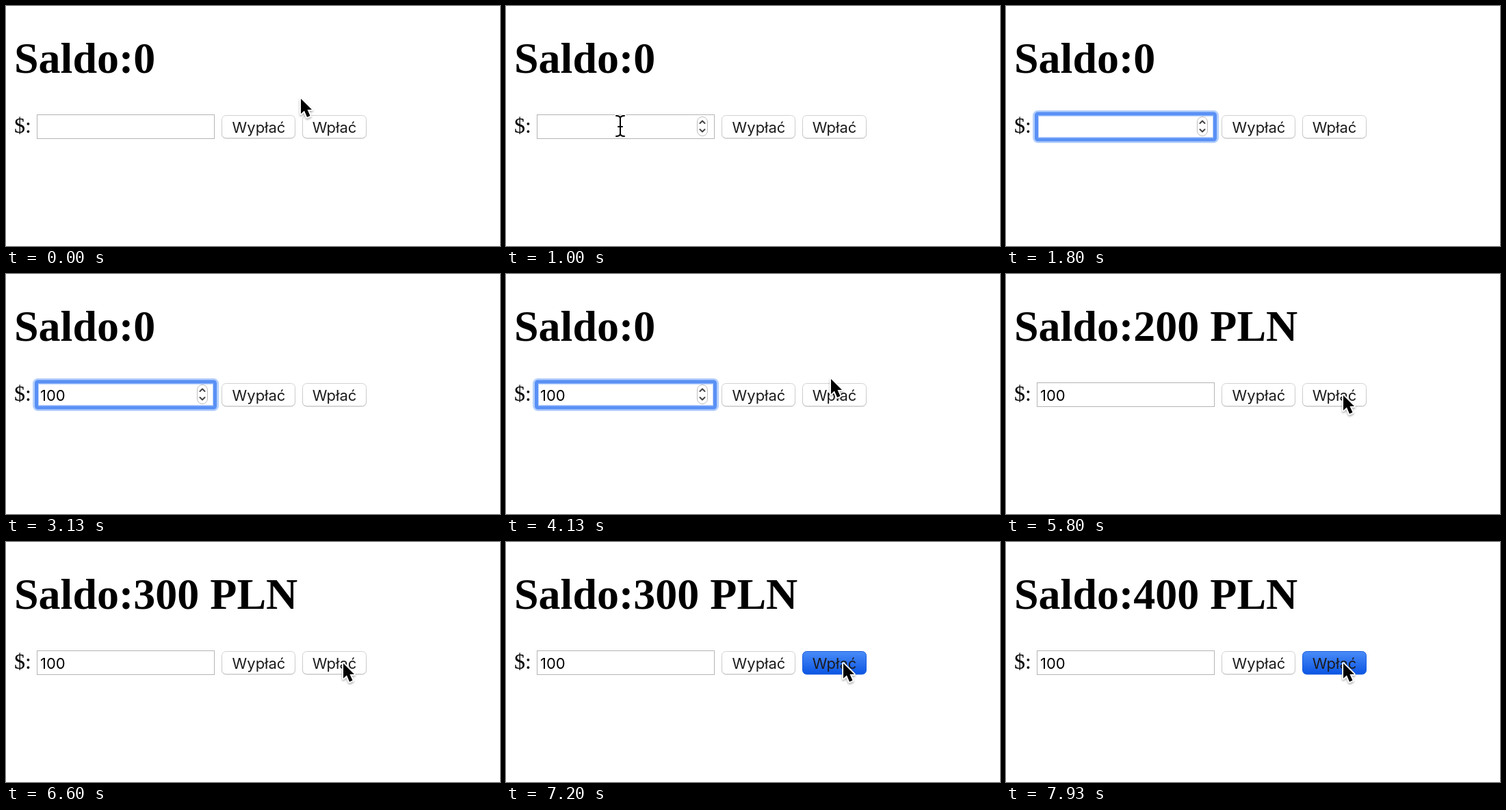
Write an HTML page that moves like this. It is 722 px wide and 352 px high and loops after 8000 ms.

```html
<!DOCTYPE html>
<html lang="pl">
<head>
<meta charset="utf-8">
<style>
  html, body { margin: 0; width: 722px; height: 352px; overflow: hidden; background: #fff; }
  svg { display: block; }
  .serif { font: 32px "Liberation Serif", serif; }
  #balance { font-size: 64px; font-weight: bold; }
  .ui { font: 22px Inter, sans-serif; fill: #1c1c1c; }
  .label { text-anchor: middle; }
  .line { fill: none; stroke: #000; stroke-width: 2; stroke-linecap: round; stroke-linejoin: round; }
  .halo { stroke: #fff; stroke-width: 5; }
</style>
</head>
<body>
<svg width="722" height="352" viewBox="0 0 722 352">
  <defs>
    <linearGradient id="blue" x2="0" y2="1">
      <stop stop-color="#4a8cf8"/><stop offset="1" stop-color="#0b55e3"/>
    </linearGradient>
    <linearGradient id="edge" x2="0" y2="1">
      <stop stop-color="#d2d2d2"/><stop offset=".8" stop-color="#c8c8c8"/><stop offset="1" stop-color="#aaa"/>
    </linearGradient>
    <filter id="shadow" x="-50%" y="-50%" width="200%" height="200%">
      <feDropShadow dx="0" dy="2" stdDeviation="1.5" flood-opacity=".35"/>
    </filter>
    <path id="beam" d="M-6-15Q0-15 0-11V11Q0 15-6 15M6-15Q0-15 0-11M0 11Q0 15 6 15M-3 1H3"/>
  </defs>

  <text id="balance" class="serif" x="12" y="98">Saldo:0</text>
  <text class="serif" x="12" y="186">$:</text>

  <rect x="45.5" y="159.5" width="259" height="35" fill="#fff" stroke="#b4b4b4"/>
  <g id="ring" fill="none">
    <rect x="43.5" y="157.5" width="263" height="39" rx="3" stroke="#b5d0fb" stroke-width="9"/>
    <rect x="44.5" y="158" width="261" height="38" rx="2" stroke="#5990f5" stroke-width="5"/>
  </g>
  <text id="amount" class="ui" x="50" y="186" style="fill:#000"></text>
  <rect id="caret" y="165" width="2" height="25"/>
  <g id="spinner">
    <rect x="279.5" y="162.5" width="15" height="28" rx="7.5" fill="#fff" stroke="#bdbdbd"/>
    <path class="line" style="stroke:#444" d="M283.5 172L287 168.500L290.500 172M283.500 181L287 184.500L290.500 181"/>
  </g>

  <rect x="315.5" y="160.500" width="107" height="33.500" rx="6" fill="#fff" stroke="url(#edge)"/>
  <text class="ui label" x="369.500" y="186">Wypłać</text>
  <rect id="deposit" x="433.500" y="160.500" width="93" height="33.500" rx="6"/>
  <text class="ui label" x="480" y="186">Wpłać</text>

  <g id="arrow" filter="url(#shadow)">
    <path d="M1 3V25L6 20.500L10 30L14.500 28L10.500 19H17Z" stroke="#fff" stroke-width="3.500" paint-order="stroke" stroke-linejoin="round"/>
  </g>
  <g id="ibeam">
    <use href="#beam" class="line halo"/><use href="#beam" class="line"/>
  </g>
</svg>
<script>
const LOOP = 8000, FOCUS = 1270, PRESS_LENGTH = 140;
const presses = [4650, 5460, 6260, 7080, 7900];
const keys = [2200, 2400, 2560];

// Pointer stops: time, x, y. The pointer is off stage between the two paths.
const approach = [[70, 430, 133], [330, 385, 155], [800, 167, 176], [1430, 167, 176], [1670, 185, 220]];
const comeback = [[3600, 690, 330], [4070, 474, 151], [4270, 474, 151], [4460, 492, 175]];

const el = id => document.getElementById(id);
const show = (id, on) => el(id).setAttribute('visibility', on ? 'visible' : 'hidden');
const countPast = (times, t) => times.filter(time => time <= t).length;

function along(path, t) {
  const next = path.findIndex(stop => stop[0] > t);
  if (next === 0) return path[0].slice(1);
  if (next < 0) return path[path.length - 1].slice(1);
  const [t0, x0, y0] = path[next - 1], [t1, x1, y1] = path[next];
  const u = (t - t0) / (t1 - t0), k = u * u * (3 - 2 * u);
  return [x0 + (x1 - x0) * k, y0 + (y1 - y0) * k];
}

function draw(t) {
  const pressed = presses.some(p => t >= p && t < p + PRESS_LENGTH);
  const deposits = countPast(presses.map(p => p + PRESS_LENGTH), t);
  const focused = t >= FOCUS && t < presses[0];
  const typed = countPast(keys, t);

  el('balance').textContent = deposits ? `Saldo:${deposits * 100} PLN` : 'Saldo:0';
  el('amount').textContent = '100'.slice(0, typed);
  const caretStart = typed ? keys[typed - 1] : FOCUS;
  el('caret').setAttribute('x', 50 + el('amount').getComputedTextLength());
  show('caret', focused && (t - caretStart) % 1000 < 500);

  const onStage = t < 1700 || t >= 3600;
  const [x, y] = along(t < 1700 ? approach : comeback, t);
  const overField = onStage && x > 45 && x < 305 && y > 159 && y < 195;
  for (const id of ['arrow', 'ibeam']) el(id).setAttribute('transform', `translate(${x} ${y})`);
  show('arrow', onStage && !overField);
  show('ibeam', overField);
  show('ring', focused);
  show('spinner', focused || overField);

  el('deposit').setAttribute('fill', pressed ? 'url(#blue)' : '#fff');
  el('deposit').setAttribute('stroke', pressed ? '#1a5fe0' : 'url(#edge)');
}

function tick() {
  draw(performance.now() % LOOP);
  requestAnimationFrame(tick);
}
tick();
</script>
</body>
</html>
```
